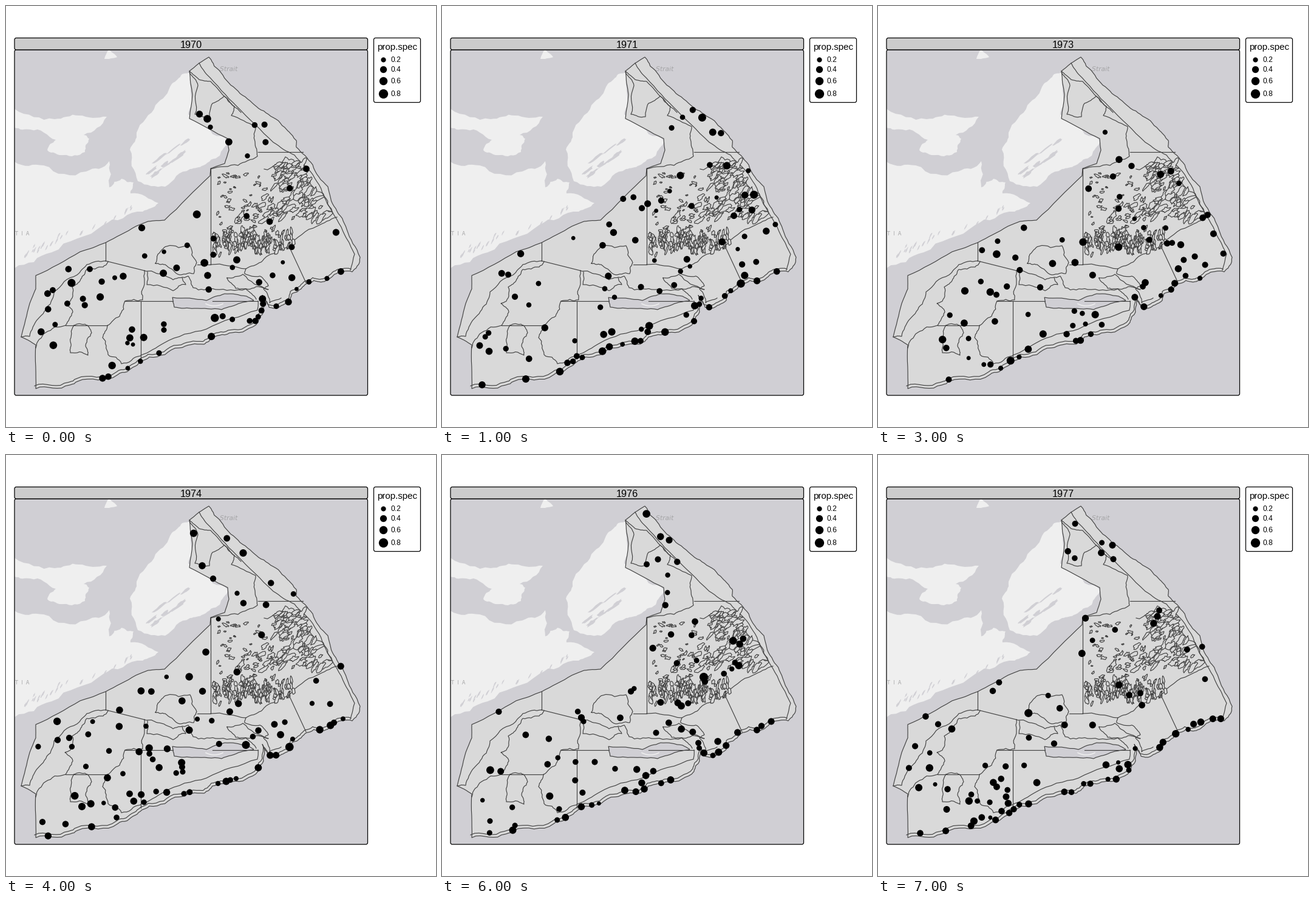
A matplotlib script that plays this animation: 708x692 px, repeating every 8 s.

```python
import numpy as np
import matplotlib.pyplot as plt
from matplotlib.animation import FuncAnimation
from matplotlib.patches import FancyBboxPatch, Polygon
from matplotlib.path import Path

W, H, DPI = 708, 692, 100
PX = 72 / DPI
SEA, LAND, SURVEY, INK = "#d0cfd4", "#efefef", "#d9d9d9", "#404040"
SANS = "Liberation Sans"
FIRST_YEAR, YEARS = 1970, 8

rng = np.random.default_rng(12)
fig = plt.figure(figsize=(W / DPI, H / DPI), dpi=DPI, facecolor="white")
ax = fig.add_axes([0, 0, 1, 1])
ax.set_xlim(0, W)
ax.set_ylim(H, 0)
ax.axis("off")


def rough(v, amp=0.1, rounds=3):
    """Turn key points into a coastline by random midpoint displacement."""
    p = np.array(v, float).reshape(-1, 2)
    for _ in range(rounds):
        d = np.diff(p, axis=0)
        mid = (p[:-1] + p[1:]) / 2
        mid += d[:, ::-1] * [1, -1] * rng.uniform(-amp, amp, (len(d), 1))
        out = np.empty((len(p) + len(mid), 2))
        out[::2], out[1::2] = p, mid
        p = out
    return p


def area(p, color, z, edge="none"):
    patch = Polygon(p, closed=True, fc=color, ec=edge, lw=1.15 * PX, zorder=z)
    ax.add_patch(patch)
    patch.set_clip_path(panel)


def line(*v, amp=0.0):
    ax.plot(*rough(v, amp).T, color=INK, lw=1.15 * PX, zorder=3)


def frame(x, y, w, h, fill, z):
    box = FancyBboxPatch((x, y), w, h, boxstyle="round,pad=0,rounding_size=3",
                         fc=fill, ec="black" if z else "none",
                         lw=1.25 * PX, zorder=z)
    return ax.add_patch(box)


def label(x, y, s, px, **kw):
    style = dict(family=SANS, color="black", va="baseline", zorder=8)
    return ax.text(x, y, s, fontsize=px * PX, **{**style, **kw})


def blob(cx, cy, a, b, tilt, wobble=0.35):
    t = np.linspace(0, 2 * np.pi, 13)[:-1]
    r = 1 + rng.uniform(-wobble, wobble, 12)
    x, y = a * r * np.cos(t), b * r * np.sin(t)
    c, s = np.cos(tilt), np.sin(tilt)
    return np.c_[cx + c * x - s * y, cy + s * x + c * y]


# base map
panel = frame(14, 72, 581, 568, SEA, 0)
cape = (305, 109, 305, 150, 300, 178, 318, 193, 366, 222, 352, 246, 325, 262,
        303, 268, 262, 297, 217, 288, 204, 236, 215, 208, 246, 163, 273, 128,
        290, 112, 305, 109)
mainland = (14, 256, 62, 262, 132, 272, 170, 255, 170, 298, 190, 284, 210, 290,
            205, 308, 251, 324, 225, 338, 160, 360, 75, 405, 14, 431)
island = (14, 169, 80, 186, 120, 180, 166, 182, 128, 212, 137, 218, 130, 240,
          95, 245, 68, 237, 82, 220, 40, 203, 14, 200)
islet = (162, 87, 168, 73, 171, 73, 183, 84, 170, 87)
for shape, amp in (cape, 0.1), (mainland, 0.13), (island, 0.13), (islet, 0.05):
    area(rough(shape, amp), LAND, 1)

# inland water: long arms in the cape, short inlets on the south shore
for k in range(9):
    area(blob(240 + 7 * k, 270 - 4.5 * k + 12 * np.sin(2.2 * k),
              rng.uniform(6, 17), rng.uniform(1, 3), -0.65), SEA, 1.1)
for _ in range(26):
    x = rng.uniform(30, 215)
    y = 418 - 0.42 * x + rng.uniform(-5, 8)
    area(blob(x, y, rng.uniform(3, 6), 0.9, -1.1), SEA, 1.1)

map_text = dict(family="DejaVu Sans", color="#a6a6a8", zorder=1.5)
label(381, 107, "t  Strait", 10.7, ha="right", style="italic", **map_text)
label(38, 377, "T  I  A", 8.2, ha="right", **map_text)

# survey area
east = rough((334, 84, 343, 99, 370, 130, 402, 156, 432, 178, 462, 203,
              478, 221, 478, 232, 505, 261, 530, 297, 543, 333, 561, 367,
              583, 413, 581, 424, 570, 437), 0.07)
south = rough((570, 437, 541, 441, 524, 453, 507, 451, 486, 465, 470, 474,
               468, 484, 444, 497, 433, 495, 424, 480, 424, 503, 415, 520,
               372, 537, 340, 544, 326, 556, 285, 562, 236, 577, 213, 592,
               184, 606, 118, 617, 105, 623, 49, 629), 0.1)
west = rough((49, 629, 49, 557, 36, 549, 25, 544, 39, 489, 49, 465, 49, 443,
              122, 404, 164, 389, 214, 362, 234, 354, 261, 352, 336, 279,
              337, 267, 360, 259, 367, 237, 365, 218, 302, 185, 307, 146,
              302, 107, 318, 94, 334, 84), 0.02)
outline = np.vstack([east, south, west])
area(outline, SURVEY, 2, INK)

bay = rough((274, 479, 330, 484, 360, 473, 396, 477, 408, 484, 387, 488,
             355, 499, 310, 497, 277, 495, 274, 479), 0.05)
area(bay, SEA, 3, INK)
bar = np.linspace(329, 357, 15)
ax.plot(bar, 493 - 0.018 * (bar - 343) ** 2, color=LAND, lw=1.6 * PX,
        zorder=3.2)

# shelf-edge strips
ax.plot(*(south + [-2, -4.5]).T, color=INK, lw=1.15 * PX, zorder=3)
line(318, 94, 330, 112, 380, 165, 440, 224, 475, 245, 505, 277, 529, 325,
     558, 377, 574, 408, 567, 434, amp=0.04)
line(302, 107, 318, 121, 337, 124, 364, 152, 387, 175, amp=0.06)
line(302, 109, 316, 131, 311, 178, 335, 182, 340, 160, 359, 148, 376, 165,
     371, 180, 411, 198, 410, 223, 414, 247, 382, 262, 337, 268, amp=0.1)
line(222, 574, 260, 554, 330, 531, 414, 500, 415, 485, amp=0.05)

# strata: straight borders, then depth contours
for border in [(415, 240, 489, 240), (337, 267, 337, 425), (466, 395, 494, 455),
               (315, 425, 337, 425), (164, 389, 164, 419), (164, 419, 228, 435),
               (98, 525, 167, 525), (195, 485, 275, 485), (222, 485, 222, 580),
               (340, 485, 415, 485)]:
    line(*border)
line(337, 425, 395, 432, 420, 421, 432, 410, 466, 395, 512, 362, 545, 347,
     amp=0.08)
line(25, 544, 39, 543, 53, 514, 73, 490, 79, 470, 117, 442, 133, 425, 164, 419,
     amp=0.09)
line(168, 420, 160, 429, 133, 433, 123, 449, 109, 462, 106, 485, 97, 489,
     110, 503, 98, 525, 65, 537, 49, 562, amp=0.12)
line(228, 435, 223, 470, 225, 483, 196, 485, 187, 510, 167, 525, 159, 545,
     168, 573, 190, 588, 222, 575, amp=0.15)
line(112, 525, 106, 552, 106, 570, 135, 574, 131, 558, 141, 537, 130, 523,
     112, 525, amp=0.13)
line(246, 423, 250, 408, 265, 395, 303, 394, 314, 422, 309, 440, 283, 441,
     262, 425, 246, 423, amp=0.13)
line(228, 435, 250, 440, 275, 450, 300, 444, 308, 463, 345, 466, 395, 465,
     412, 482, amp=0.12)
line(233, 437, 232, 458, 275, 468, 296, 458, 290, 447, amp=0.15)
line(364, 447, 390, 441, 432, 466, 405, 464, 378, 464, 364, 447, amp=0.12)
line(395, 432, 393, 440, 418, 444, 432, 460, 424, 465, 434, 488, 453, 480,
     amp=0.12)
line(425, 268, 460, 248, 485, 262, 518, 306, 537, 338, 490, 344, amp=0.2)

# patchy banks: upright fringe, slanted north-east field, loose scatter
for _ in range(125):
    x = rng.uniform(341, 474)
    y = rng.triangular(366, 389, 411) - 0.12 * max(x - 420, 0)
    area(blob(x, y, rng.uniform(2, 8), rng.uniform(1.2, 2.8),
              rng.uniform(1.1, 2), 0.45), SURVEY, 3, INK)
for _ in range(85):
    y = rng.uniform(257, 352)
    x = rng.uniform(446 - 0.2 * (y - 250), 484 + 0.45 * (y - 250))
    long = rng.uniform(2.5, 10)
    area(blob(x, y, long, long * rng.uniform(0.3, 0.6),
              rng.uniform(-1.2, -0.2), 0.45), SURVEY, 3, INK)
for _ in range(60):
    long = rng.uniform(1.5, 5) * rng.choice([1, 2.2], p=[0.88, 0.12])
    area(blob(rng.uniform(348, 445), rng.uniform(272, 370), long, 0.45 * long,
              rng.uniform(-1, 0.6), 0.45), SURVEY, 3, INK)


def survey(year):
    """Random stations for one year, denser on the shelf and along its edge."""
    draw = np.random.default_rng(year)
    shelf, hole = Path(outline), Path(bay)
    count = draw.integers(74, 92)
    spots = []
    while len(spots) < count:
        if draw.random() < 0.15:
            p = draw.choice(south[:-12]) + draw.normal(-2, 1.5, 2)
        else:
            p = draw.uniform([50, 95], [570, 628])
        sparse = p[1] < 415 and draw.random() < 0.35
        if sparse or not shelf.contains_point(p) or hole.contains_point(p):
            continue
        if all(np.hypot(*(p - q)) > 7 for q in spots):
            spots.append(p)
    return np.array(spots), np.clip(draw.normal(10.3, 1.5, count), 6.8, 14)


stations = [survey(FIRST_YEAR + i) for i in range(YEARS)]

# frames and legend
frame(14, 72, 581.5, 568, "none", 6)
frame(14, 52.5, 581.5, 19.5, "#cccccc", 6)
frame(605.5, 52.5, 77, 106, "white", 6)
label(611, 72, "prop.spec", 15)
for value, y, d in [("0.2", 87.5, 8.2), ("0.4", 104, 11.3),
                    ("0.6", 122.5, 13.4), ("0.8", 143.5, 15.3)]:
    ax.scatter(620.5, y, s=(d * PX) ** 2, color="black", lw=0, zorder=8)
    label(634, y + 4.4, value, 12)

title = label(305, 69, "", 16.3, ha="center")
dots = ax.scatter([], [], color="black", lw=0, zorder=5)


def update(i):
    spots, diameters = stations[i]
    title.set_text(str(FIRST_YEAR + i))
    dots.set_offsets(spots)
    dots.set_sizes((diameters * PX) ** 2)
    return title, dots


anim = FuncAnimation(fig, update, frames=YEARS, interval=1000, repeat=True,
                     repeat_delay=0)
plt.show()
```
